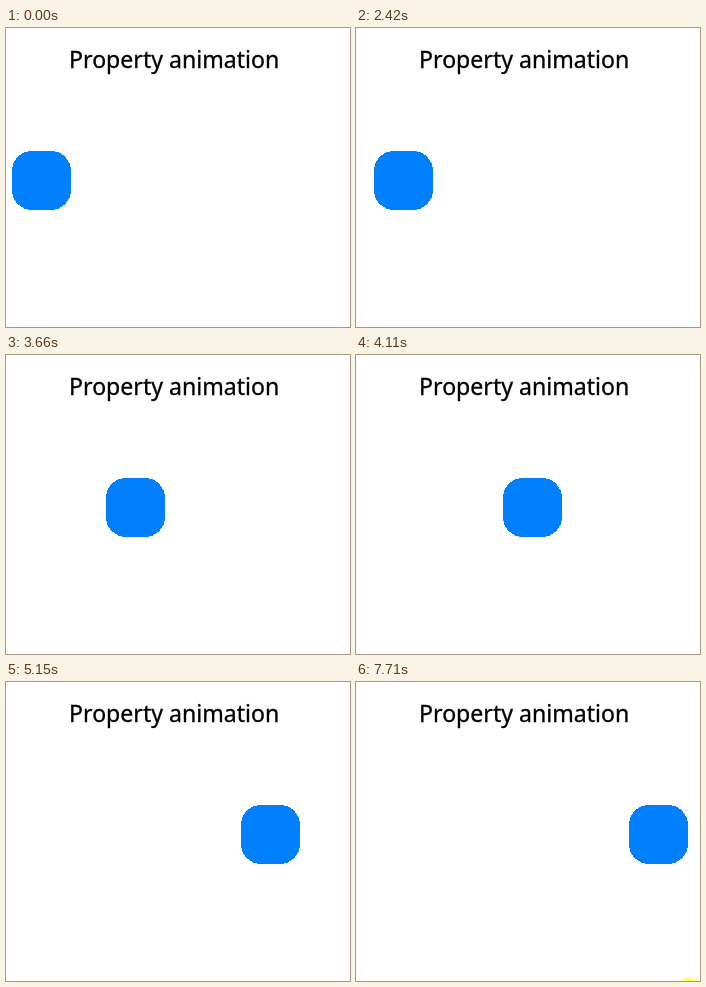
Write an HTML page that moves like this. It is 344 px wide and 299 px high and loops after 7.77 s.

```html
<!DOCTYPE html>
<html lang="en">
<head>
<meta charset="utf-8">
<title>Property animation</title>
<style>
  html, body { margin: 0; width: 100%; height: 100%; overflow: hidden; background: #fff; }
  svg { display: block; width: 344px; height: 299px; }
  text {
    font: 23.1px "Noto Sans", "Open Sans", sans-serif;
    text-anchor: middle;
    stroke: #000;
    stroke-width: 0.3px;
  }
</style>
</head>
<body>
<svg viewBox="0 0 344 299">
  <text x="168.2" y="40">Property animation</text>
  <rect id="box" x="6" y="123" width="59" height="59" rx="20" fill="#007fff" shape-rendering="crispEdges"/>
  <circle id="pointer" cx="333" cy="307" r="12" fill="#ffff80"/>
</svg>
<script>
  const LOOP = 7770, BEGIN = 1740, DURATION = 4580, STEP = 67.6;
  const FROM = 6, TO = 273, POINTER_AT = 7710;
  const box = document.getElementById('box');
  const pointer = document.getElementById('pointer');

  // cubic-bezier(.42, 0, .58, 1), solved by bisection
  function easeInOut(p) {
    let low = 0, high = 1, s;
    for (let i = 0; i < 20; i++) {
      s = (low + high) / 2;
      const x = 3 * s * (1 - s) * (0.42 * (1 - s) + 0.58 * s) + s ** 3;
      if (x < p) low = s; else high = s;
    }
    return s * s * (3 - 2 * s);
  }

  function leftAt(t) {
    const elapsed = Math.floor((t - BEGIN) / STEP) * STEP;
    const progress = Math.min(1, Math.max(0, elapsed / DURATION));
    return Math.round(FROM + (TO - FROM) * easeInOut(progress));
  }

  const start = performance.now();
  function draw() {
    const t = (performance.now() - start) % LOOP;
    box.setAttribute('x', leftAt(t));
    pointer.setAttribute('visibility', t >= POINTER_AT ? 'visible' : 'hidden');
    requestAnimationFrame(draw);
  }
  draw();
</script>
</body>
</html>
```
